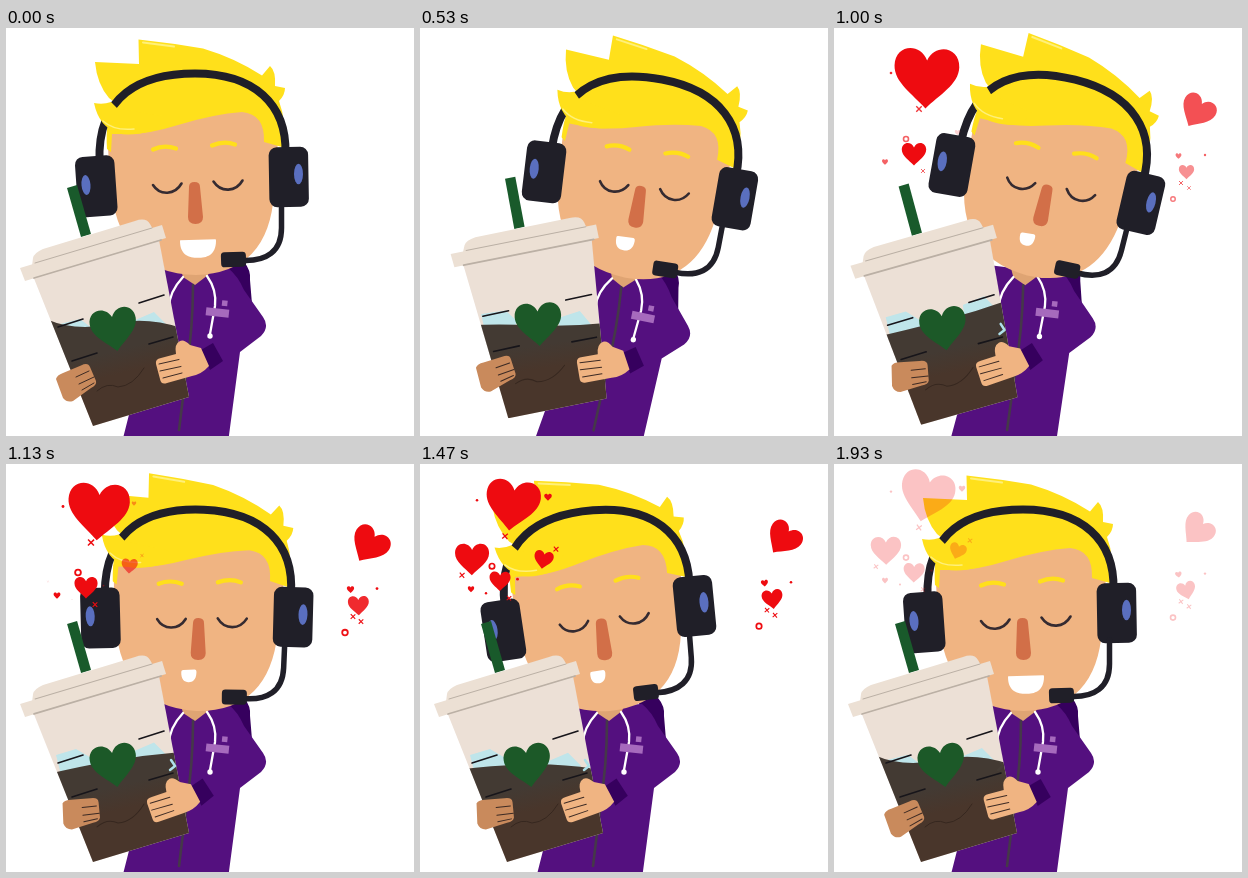
An HTML page for the animation above (1990 ms loop, 408 by 408 pixels).

```html
<!DOCTYPE html>
<html lang="en">
<head>
<meta charset="utf-8">
<title>Coffee hug</title>
<style>
  html, body { margin: 0; width: 100%; height: 100%; overflow: hidden; background: #fff; }
  svg { display: block; width: 100vw; height: 100vh; }
  .line { fill: none; stroke-linecap: round; stroke-linejoin: round; }
  .skin { fill: #f0b482; }
  .hair { fill: #ffe01b; }
  .dark { fill: #201f28; }
  .cup { fill: #ece0d4; }
  .fingers { stroke: #3c2a24; stroke-width: 1; }
</style>
</head>
<body>
<svg viewBox="0 0 408 408">
  <defs>
    <clipPath id="cupShape"><path d="M27 248L153 212L183 369L87 398Z"/></clipPath>
    <linearGradient id="brew" gradientUnits="userSpaceOnUse" x1="100" y1="325" x2="106" y2="348">
      <stop stop-color="#433a33"/><stop offset="1" stop-color="#49362b"/>
    </linearGradient>
  </defs>

  <g id="figure">
    <path fill="#36005e" d="M218 236L238 234Q245 242 244 252L246 276L228 270Z"/>
    <path fill="#54107f" d="M150 237L178 240L205 241L222 240Q232 248 238 262L257 289Q264 299 255 308L234 324L220 430H112L145 300Z"/>
    <path fill="#dfa473" d="M174 238H206L202 247L189 257L177 249Z"/>
    <path class="line" stroke="#453849" stroke-width="2.6" d="M187 257Q187 300 180 345L173 402"/>
    <g class="line" stroke="#fff" stroke-width="2.3">
      <path d="M177 249Q163 264 163 280L165 295"/>
      <path d="M201 248Q211 262 209 278L204 306"/>
    </g>
    <circle cx="204" cy="308" r="2.7" fill="#fff"/>
    <g fill="#a66abd">
      <rect x="200" y="280.500" width="23" height="8" transform="rotate(6 211 284)"/>
      <rect x="216" y="272.500" width="5.500" height="5.500" transform="rotate(6 219 275)"/>
    </g>
  </g>

  <g id="head">
    <path class="skin" d="M101 105L104 150Q110 246 190 247Q263 245 268 165L273 100Q240 60 180 76Z"/>
    <path class="hair" d="M132.500 11.500Q165 15 197 20.500Q229 30 256 47.500L264 38Q270 43 269 58L279 60Q279 67 273 73Q281 94 276 119L258 114Q259 86 236 84Q208 86 172 97Q140 107 118 106L106 106L105 124L101 121Q99 92 108 74L103 70Q91 56 89 34L133 36Z"/>
    <path class="line" stroke="#fff07a" stroke-width="2" d="M137 14.500L168 18.500"/>
    <path class="line" stroke="#201f28" stroke-width="8" d="M93.500 134C91 67 135 45.500 189 45.500C248 45.500 281 76 279.500 126"/>
    <path class="hair" d="M88 75Q97 77 105 74L111 80L156 88L146 103Q122 109 112 105Q93 99 88 75Z"/>
    <path class="line" stroke="#fff07a" stroke-width="1.500" d="M97 93Q108 103 128 101"/>
    <rect class="dark" x="70.500" y="128" width="39.500" height="60.500" rx="8" transform="rotate(-4 90 158)"/>
    <rect class="dark" x="263" y="119" width="39.500" height="60" rx="8" transform="rotate(-1 283 149)"/>
    <ellipse cx="80" cy="157" rx="4.500" ry="10" fill="#5a6fbf" transform="rotate(-5 80 157)"/>
    <ellipse cx="292.500" cy="146" rx="4.500" ry="10.300" fill="#5a6fbf"/>
    <path class="line" stroke="#201f28" stroke-width="5.500" d="M275.500 176V200C275.500 224 260 233 238 232.500"/>
    <rect class="dark" x="215" y="224" width="25" height="15" rx="3.500" transform="rotate(-2 227 231)"/>
    <g class="line" stroke="#352b31" stroke-width="2.600">
      <path d="M147 157C154 168 169 167 175.500 155.500"/>
      <path d="M207.500 153.500C215 165 230 164 236.500 152.500"/>
    </g>
    <g class="line" stroke="#ffdf1b" stroke-width="4.200">
      <path d="M147 121.500Q158 116.500 170 120.500"/>
      <path d="M206 117.500Q218 112.500 229 116.500"/>
    </g>
    <path fill="#d26f48" d="M183 159Q183 154 188.500 154Q194 154 194 159L197 189Q197 196 189.500 196Q182 196 182 189Z"/>
    <path id="mouth" fill="#fff"/>
  </g>

  <g id="drink">
    <path fill="#195a2b" d="M61 160L71 157L85 206L75 209Z"/>
    <g clip-path="url(#cupShape)">
      <path fill="#ece0d6" d="M0 200H200V400H0Z"/>
      <path id="ice" fill="#bfe5ea"/>
      <path id="coffee" fill="url(#brew)"/>
      <path class="line" stroke="#36271f" stroke-width="1" d="M91 363Q101 354 112 359Q127 358 138 340"/>
    </g>
    <path id="splash" class="line" stroke="#aee0ea" stroke-width="2.500" d="M165 296L169 302L164 306"/>
    <path class="cup" d="M26 238L27 230Q28 225 37 221L129 193Q140 189 144 196L148 203Z"/>
    <path class="cup" d="M14 240L156 197L160 210L19 253Z"/>
    <g class="line" stroke="#bbb0a5">
      <path stroke-width="1.800" d="M28 250L155 212"/>
      <path stroke-width="1" d="M29 235L146 200"/>
    </g>
    <path class="line" stroke="#17151a" stroke-width="1.600" d="M52 299L77 291M133 275L158 267M66 333L91 325M143 316L167 309"/>
    <path id="badge" fill="#1c5928"/>
    <g id="farHand">
      <path fill="#c98a5c" d="M50 351Q51 347 57 345L75 337.500Q82 334 84 339L90 353Q91 357 85 360L67 373Q61 375 57 370Z"/>
      <path class="line fingers" d="M70 349L83 343M73 356L88 349M76 362L88 355"/>
    </g>
    <g id="nearHand">
      <path fill="#36005e" d="M195 322L207 315L217 333L204 342Z"/>
      <path class="skin" d="M150 336Q149 331 155 330L170 326Q168 316 174 313Q178 311 184 317L195 320L203 338Q196 346 186 348L161 355Q155 357 154 351Z"/>
      <path class="line fingers" d="M153 336L173 331.500M154 343L175 338.500M157 350L176 345"/>
    </g>
  </g>

  <g id="love" fill="#ee0b10"></g>
</svg>

<script>
const LOOP = 1990;
const HEART = "M0 .47C-.2 .26-.5 .08-.5-.18C-.5-.5-.12-.55 0-.27C.12-.55 .5-.5 .5-.18C.5 .08 .2 .26 0 .47Z";
const $ = id => document.getElementById(id);
const set = (el, attrs) => { for (const k in attrs) el.setAttribute(k, attrs[k]); };
const mix = (a, b, k) => a + (b - a) * k;
const clamp = k => Math.min(1, Math.max(0, k));
const linear = k => k;
const sine = k => (1 - Math.cos(Math.PI * k)) / 2;

// Value at time t along [time, value] pairs.
function track(t, keys, ease = sine) {
  const i = keys.findIndex(key => key[0] > t);
  if (i === 0) return keys[0][1];
  if (i < 0) return keys[keys.length - 1][1];
  const [t0, a] = keys[i - 1], [t1, b] = keys[i];
  return mix(a, b, ease((t - t0) / (t1 - t0)));
}

const lean = [[20, 0], [565, 5.5], [1150, 0]];
const nod = [[130, 0], [800, 16.5], [925, 16.5], [1290, -6.8], [1750, 0]];
const smile = [[130, 1], [680, 0], [1600, 0], [1900, 1]];
const grip = [[560, 0], [950, 1], [1690, 1], [1960, 0]];
const pop = [[0, 0], [60, .35], [140, .8], [220, 1.06], [400, 1.2], [670, 1.07], [900, 1]];

// Coffee surface: left height, wave control, middle, right height.
const surface = [[291, 298, 309, 311, 310, 301, 291], [304, 297, 305, 304, 302, 301, 304],
  [296, 296, 303, 294, 300, 301, 296], [300, 289, 294, 271, 306, 304, 300]];
const surfaceTimes = [0, 270, 530, 1000, 1270, 1670, 1930];
const surfaceTracks = surface.map(ys => ys.map((y, i) => [surfaceTimes[i], y]));

// kind, x, y, size, start, tilt, spin
const bits = [
  ["heart", 92.5, 50, 54, 600, 2, .012], ["heart", 363, 84, 33, 780, 31, .012],
  ["heart", 52, 104, 29.5, 1130, 2, -.003], ["heart", 80, 126, 21, 525, 0, .002],
  ["heart", 123.5, 104.5, 17, 945, 2, .018], ["heart", 352.5, 144, 19, 860, 0, -.016],
  ["heart", 128, 42, 6.5, 1010, 0, 0], ["heart", 51, 134, 6, 800, 0, 0],
  ["heart", 344.5, 128, 6.5, 830, 0, -.01],
  ["cross", 85, 81, 5, 740, 0, .01], ["cross", 89, 143, 4, 800, 0, .01],
  ["cross", 136, 94, 4, 1000, 0, .01], ["cross", 42, 120, 4, 1060, 0, .01],
  ["cross", 347, 155, 4, 800, 0, .01], ["cross", 355, 160, 4, 830, 0, .01],
  ["ring", 72, 111, 5, 800], ["ring", 339, 171, 5, 830],
  ["dot", 57, 45, 2.4, 740], ["dot", 97.5, 124, 2.4, 1000],
  ["dot", 66, 138, 2, 1050], ["dot", 371, 127, 2.4, 800]
];
const circle = r => `M-${r} 0a${r} ${r} 0 1 0 ${2 * r} 0a${r} ${r} 0 1 0-${2 * r} 0Z`;
const kinds = {
  heart: { d: HEART },
  dot: { d: circle(.5) },
  ring: { d: circle(.5), fill: "none", stroke: "#ee0b10", "stroke-width": .32 },
  cross: { d: "M-.5-.5L.5 .5M.5-.5L-.5 .5", stroke: "#ee0b10", "stroke-width": .25 }
};
const floating = bits.map(([kind, x, y, size, start, tilt = 0, spin = 0]) => {
  const el = document.createElementNS("http://www.w3.org/2000/svg", "path");
  set(el, kinds[kind]);
  $("love").append(el);
  return { el, x, y, size, start, tilt, spin };
});

set($("badge"), { d: HEART, transform: "translate(108 301.5) rotate(-9) scale(46.5)" });

function drawMouth(t) {
  const k = track(t, smile);
  const x = mix(181, 192, k), y = mix(212.5, 221, k);
  const w = mix(7.6, 18, k), h = mix(6, 8.8, k), r = mix(2, .5, k);
  set($("mouth"), { d: `M${x - w} ${y - h + r}Q${x - w} ${y - h} ${x - w + r} ${y - h}L${x + w - r} ${y - h - 1}`
    + `Q${x + w} ${y - h - 1} ${x + w} ${y - h + r}C${x + w} ${y + h * .75} ${x + w * .45} ${y + h} ${x} ${y + h}`
    + `C${x - w * .5} ${y + h} ${x - w} ${y + h * .7} ${x - w} ${y - h + r}Z` });
}

function drawCoffee(t, hold) {
  const [left, wave, middle, right] = surfaceTracks.map(keys => track(t, keys, linear));
  set($("coffee"), { d: `M40 ${left}Q70 ${wave} 105 ${middle}T175 ${right}H200V410H40Z` });
  const a = mix(297, 291, hold), b = (middle + right) / 2 - 14;
  set($("ice"), { d: `M50 ${a}L${mix(74, 70, hold)} ${a - 6}L87 ${a + 4}L80 315H56Z`
    + `M127 ${b + 9}L148 ${b}L161 ${b + 13}L150 315H132Z` });
  set($("splash"), { opacity: hold });
}

function drawLove(t) {
  set($("love"), { opacity: clamp((LOOP - t) / 240) });
  for (const { el, x, y, size, start, tilt, spin } of floating) {
    const age = t - start, since = t - 1000;
    const scale = size * track(age, pop, linear);
    set(el, {
      opacity: clamp(age / 310),
      transform: `translate(${x} ${y - since * .0187}) rotate(${tilt + spin * since}) scale(${scale})`
    });
  }
}

function draw(t) {
  const sway = `rotate(${track(t, lean)} 170 408)`;
  const hold = track(t, grip);
  set($("figure"), { transform: sway });
  set($("drink"), { transform: sway });
  set($("head"), { transform: `${sway} rotate(${track(t, nod) - track(t, lean)} 190 250)` });
  set($("farHand"), { transform: `translate(${5 * hold} ${-4 * hold}) rotate(${18 * hold} 75 352)` });
  set($("nearHand"), { transform: `translate(${-9 * hold} ${hold}) rotate(${-4 * hold} 185 335)` });
  drawMouth(t);
  drawCoffee(t, hold);
  drawLove(t);
}

const begin = performance.now();
function tick() {
  draw((performance.now() - begin) % LOOP);
  requestAnimationFrame(tick);
}
tick();
</script>
</body>
</html>
```
